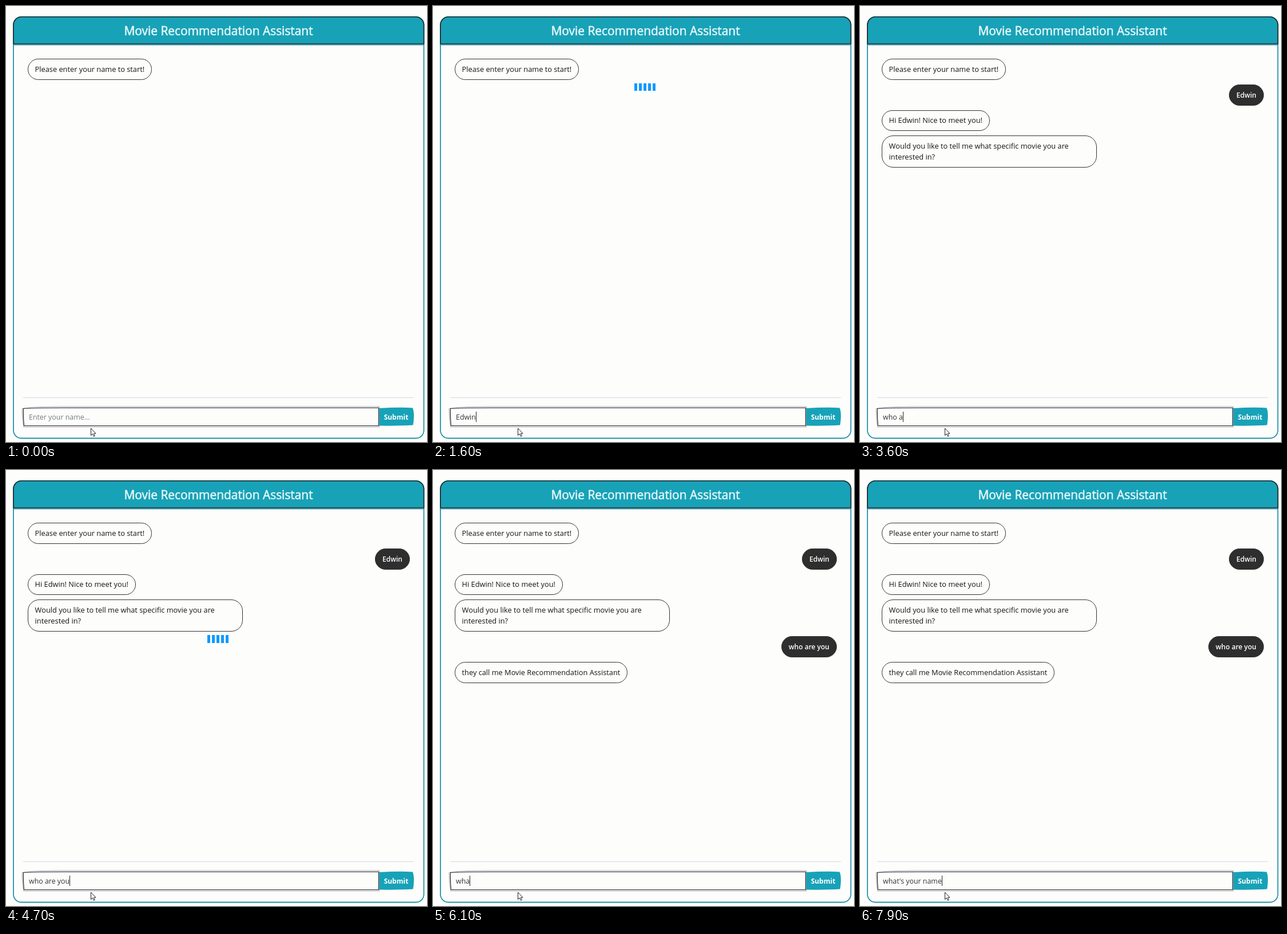
Write an HTML page that moves like this. It is 736x761 px and loops after 8000 ms.

```html
<!DOCTYPE html>
<html lang="en">
<head>
<meta charset="utf-8">
<title>Movie Recommendation Assistant</title>
<style>
  html, body { margin: 0; width: 100%; height: 100%; overflow: hidden; background: #fdfdfc; }
  svg { display: block; width: 736px; height: 761px; }
  text, #chat { font: 12.8px/19.2px "Open Sans", sans-serif; color: #151515; white-space: pre; }
  .title { font-size: 20.9px; fill: #e6f6f7; stroke: #e6f6f7; stroke-width: .6px; text-anchor: middle; }
  .submit { font-size: 12px; font-weight: 700; fill: #fff; text-anchor: middle; }
  #field { font-size: 12.4px; }
  #chat { position: absolute; left: 37.6px; top: 92px; width: 668.4px;
    display: flex; flex-direction: column; align-items: flex-start; gap: 8px; }
  .bot, .user { box-sizing: border-box; max-width: 376px; padding: 7.8px 12px;
    border: 1px solid #333; border-radius: 20px; white-space: normal; }
  .user { align-self: flex-end; background: #2e2e2e; color: #fff; font-size: 12px; font-weight: 600; }
  .loader { align-self: center; margin: -2px 2px 0 0; width: 37px; height: 13.5px;
    background: repeating-linear-gradient(90deg, #19f 0 5px, transparent 5px 8px); }
</style>
</head>
<body>
<svg viewBox="0 0 736 761">
  <rect x="13" y="19" width="717.5" height="735.5" rx="14" fill="none" stroke="#2492a8" stroke-width="1.8"/>
  <path d="M13 66V33a14 14 0 0 1 14-14H716.5a14 14 0 0 1 14 14V66Z" fill="#17a2b8" stroke="#222b2d" stroke-width="1.7"/>
  <path d="M13 67.7H730.5" stroke="#2492a8" stroke-width="1.4"/>
  <text class="title" x="371.5" y="51">Movie Recommendation Assistant</text>

  <path d="M30 683.5H713" stroke="#d6d8e2"/>
  <path d="M28.500 703Q45 699.500 90 699.500H652.500V734.500H31Q28.500 720 28.500 703Z" fill="none" stroke="#c9c6d2" stroke-width="2"/>
  <path d="M30.500 702.500Q60 701.500 100 701.500H651.500V732.500H31.500Q30 718 30.500 702.500Z" fill="#fdfdfc" stroke="#333" stroke-width="1.2"/>
  <path d="M652.500 702Q690 700 711 701.500Q713.500 708 713 718T711.500 731.500Q690 733 652.500 732.500Z" fill="#17a2b8"/>
  <text class="submit" x="682" y="721.500">Submit</text>
  <text id="field" x="40" y="722"></text>
  <path id="caret" d="M.5 708V726" stroke="#222"/>
  <path d="M148.500 737V749.500L151.300 746.800L153.400 751.300L155.300 750.400L153.300 746.200H157Z" fill="#fff" stroke="#222"/>
</svg>
<div id="chat"></div>
<script>
const LOOP = 8000, BEAT = 100, BLINK = 500;
const [chat, field, caret] = ["chat", "field", "caret"].map(id => document.getElementById(id));
const parts = [], edits = [];

function post(start, kind, text = "", end = LOOP) {
  const el = document.createElement("div");
  el.className = kind;
  el.textContent = text;
  chat.append(el);
  parts.push({ el, start, end });
}

// One key per beat; a dot is a pause.
function type(start, keys) {
  let text = "";
  [...keys].forEach((key, i) => {
    if (key !== ".") edits.push({ at: start + i * BEAT, text: text += key });
  });
}

function ask(at, hint) {
  edits.push({ at, text: "", hint });
}

// The loader shows for one beat, then the user's line and the replies appear.
function send(at, text, ...replies) {
  post(at, "loader", "", at + BEAT);
  post(at + BEAT, "user", text);
  replies.forEach(reply => post(at + BEAT, "bot", reply));
  ask(at + BEAT, "Please type a movie name...");
}

post(0, "bot", "Please enter your name to start!");
ask(-BLINK, "Enter your name...");
type(300, "E......dwi.n");
send(1600, "Edwin", "Hi Edwin! Nice to meet you!",
  "Would you like to tell me what specific movie you are interested in?");
type(3000, "w.h.o are. .y.ou");
send(4700, "who are you", "they call me Movie Recommendation Assistant");
type(5900, "wha.t's. .y.our n.ame");

function draw(now) {
  const t = now % LOOP;
  for (const { el, start, end } of parts)
    el.style.display = t >= start && t < end ? "" : "none";

  const { at, text, hint } = edits.findLast(edit => edit.at <= t);
  field.textContent = text || hint;
  field.style.fill = text ? "#333" : "#73797e";
  const x = 40 + (text ? field.getComputedTextLength() : 0);
  caret.setAttribute("transform", `translate(${Math.round(x)})`);
  caret.style.display = (t - at) % (2 * BLINK) < BLINK ? "" : "none";
  requestAnimationFrame(draw);
}
draw(0);
</script>
</body>
</html>
```
